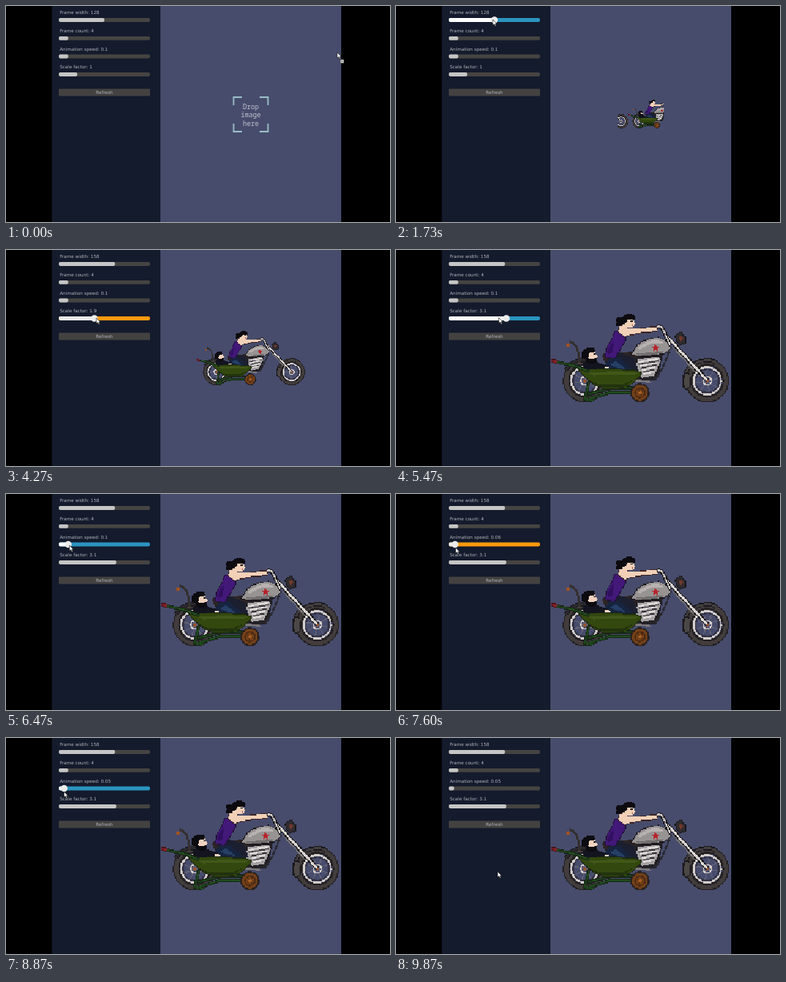
These frames come from a looping animation (480x270 px, 9940 ms). An HTML page with a canvas:

```html
<!DOCTYPE html>
<html lang="en">
<head>
<meta charset="utf-8">
<title>Sprite sheet viewer</title>
<style>
html, body { margin: 0; width: 100%; height: 100%; overflow: hidden; background: #000; }
canvas, svg { position: absolute; left: 0; top: 0; width: 480px; height: 270px; display: block; }
.label { font: 5.65px "DejaVu Sans", sans-serif; fill: #b0b3bb; }
.drop { font: 300 8.4px "Noto Sans Mono", monospace; fill: #bfc2cd; text-anchor: middle; }
</style>
</head>
<body>
<canvas id="view" width="1440" height="810"></canvas>
<svg id="ui" viewBox="0 0 480 270">
  <rect x="57.300" width="135.700" height="270" fill="#141b2c"/>
  <g id="sliders"></g>
  <rect x="66" y="103.500" width="114" height="9" rx="1" fill="#444241"/>
  <text class="label" x="123" y="110" text-anchor="middle">Refresh</text>
  <g id="zone">
    <path d="M284.500 124V114H295M317 114H327.500V124M327.500 147V157H317M295 157H284.500V147"
      fill="none" stroke="#98bdc6" stroke-width="1.800"/>
    <text class="drop" x="306" y="128.500">Drop</text>
    <text class="drop" x="306" y="139">image</text>
    <text class="drop" x="306" y="150">here</text>
  </g>
  <g id="cursor">
    <path d="M0 0V7L1.700 5.600L2.900 8.200L4.100 7.600L3 5.200H5Z" fill="#fff" stroke="#111" stroke-width=".6"/>
    <g id="badge">
      <rect x="4" y="9" width="4.200" height="4.400" fill="#f4f4f4" stroke="#222" stroke-width=".5"/>
      <path d="M6.100 10v2.400M4.900 11.200h2.400" stroke="#333" stroke-width=".6"/>
    </g>
  </g>
</svg>
<script>
const LOOP = 9940, STEP = 1000 / 15, FRAMES = 149;
const FW = 158, FH = 82, UNIT = 0.456, CX = 306, CY = 135;
const DROP_AT = 870;
const $ = id => document.getElementById(id);

// ---------- sprite sheet: vector shapes snapped to hard pixels ----------
function makeCanvas(w, h) {
  const c = document.createElement('canvas');
  c.width = w;
  c.height = h;
  return c;
}
const sheet = makeCanvas(FW * 4, FH), sheetCtx = sheet.getContext('2d');
const cell = makeCanvas(FW, FH), pen = cell.getContext('2d', { willReadFrequently: true });
const EDGE = '#1c191d';
let pose = 0, lift = 0;

function plot(color, d, width) {
  const k = 1 / (UNIT * 3.1), path = new Path2D(d);
  pen.setTransform(1, 0, 0, 1, 0, 0);
  pen.clearRect(0, 0, FW, FH);
  pen.setTransform(k, 0, 0, k, FW / 2 - CX * k, FH / 2 + (lift - CY) * k);
  pen.lineJoin = 'round';
  if (width) {
    pen.strokeStyle = color;
    pen.lineWidth = width;
    pen.stroke(path);
  } else {
    pen.fillStyle = color;
    pen.fill(path);
  }
  const img = pen.getImageData(0, 0, FW, FH);
  for (let i = 3; i < img.data.length; i += 4) img.data[i] = img.data[i] > 112 ? 255 : 0;
  pen.putImageData(img, 0, 0);
  sheetCtx.drawImage(cell, pose * FW, 0);
}
function shape(color, d, edge = EDGE) {
  plot(edge, d, 2.2);
  plot(color, d);
}
function bar(color, d, width, edge = EDGE) {
  plot(edge, d, width + 2.4);
  plot(color, d, width);
}
const circle = (x, y, r) => `M${x - r} ${y}a${r} ${r} 0 1 0 ${2 * r} 0a${r} ${r} 0 1 0 ${-2 * r} 0Z`;

function spokes(x, y, r, n, turn) {
  let d = '';
  for (let i = 0; i < n; i++) {
    const a = turn + i * 2 * Math.PI / n;
    d += `M${x} ${y}L${x + r * Math.cos(a)} ${y + r * Math.sin(a)}`;
  }
  return d;
}
function wheel(x, y) {
  plot('#252123', circle(x, y, 22.8), 8.6);
  plot('#423d3c', circle(x, y, 23.4), 4.6);
  plot('#d0cbc9', circle(x, y, 17), 2.2);
  plot('#343346', circle(x, y, 14.8), 1.6);
  plot('#646377', spokes(x, y, 14, 8, pose * 0.2), 1.3);
  plot('#d3cecb', circle(x, y, 5), 1.8);
  plot('#98512b', circle(x, y, 2));
}
function star(x, y, r) {
  let d = '';
  for (let i = 0; i < 10; i++) {
    const a = i * Math.PI / 5 - Math.PI / 2, q = i % 2 ? r * 0.42 : r;
    d += `${i ? 'L' : 'M'}${x + q * Math.cos(a)} ${y + q * Math.sin(a)}`;
  }
  return d + 'Z';
}

function drawBike() {
  wheel(236, 163.5);
  wheel(389, 163.5);

  // rear guard and tail rod
  bar('#2b2a2e', 'M212 150Q219 138 236 137Q250 138 258 150', 3);
  plot('#34302f', 'M217 114Q226 118 228 128L230 140', 2.6);
  plot('#a4521f', 'M213 117h4v4h-4Z');

  // frame and engine
  plot('#252329', 'M258 130L300 129L334 129L330 150L324 163L288 166L266 154Z');
  plot('#2b2930', 'M342 126L333 148L324 163', 2);
  shape('#a5a1a3', 'M302 137L327 133L331 138L323 157L307 160L299 149Z');
  plot('#dcd8d6', 'M303 140L328 136M305 145L327 141M307 150L325 146M309 155L323 152', 1.8);
  plot('#39363c', 'M303 143L328 138.500M306 148L326 143.500M308 153L324 149', 1.3);
  shape('#aba7a8', circle(295, 152, 4));
  plot('#7c787b', 'M280 160L300 163L318 165', 2);

  // tank and seat
  plot('#2c2424', 'M258 131Q272 128 298 127L303 134L284 140L260 138Z');
  shape('#989393', 'M294 131L303 118Q315 110 329 110L340 116L343 123L335 129L314 132Z');
  plot('#b7b2b0', 'M302 123Q311 113 326 112L336 116L320 117L307 123Z');
  plot('#726d6e', 'M298 130L336 126L333 129L314 132Z');
  plot('#b8232a', star(324, 122.5, 5.6));

  // front end
  bar('#433f40', 'M362 173Q358 157 366 147Q376 138 390 138Q397 138 401 141', 2.8);
  shape('#4b4746', 'M361 155L366 155L367 171L362 174L360 167Z');
  bar('#dcd7d3', 'M338 107L389 163', 2.6);
  plot('#7d7878', 'M346 121L374 152', 1.6);
  bar('#ccc7c4', 'M324 98L329 95Q334 97 337 107L343 119', 1.8);
  shape('#2f2c30', 'M350 107L356 103L361 109L361 116L355 118L351 114Z');
  plot('#71382b', circle(356.5, 110.5, 2.6));

  lift = pose === 2 ? -1.4 : 0;
  drawRider();
  drawPassenger();
  lift = 0;
  drawBarrow();
}

function drawRider() {
  const skin = '#f2d0b8', hair = '#0d0b10', line = '#3d2729';
  plot('#1b1f30', 'M262 132L278 128L296 134L303 150L294 152L286 142L266 140Z');
  shape('#421879', 'M274 102L285 105L287 111L281 122L273 135L262 133L264 123L270 112Z', '#25113f');
  plot('#321060', 'M266 123L273 111L270 128L264 132Z');
  shape(skin, 'M280 95L287 95L290 99L304 98.500L325 96.500L327 101L308 103L291 106L286 108L278 102Z', line);
  plot(skin, 'M285 85L296 85L297 89L299 92L296 96L289 97L284 95Z');
  plot(hair, 'M281 86Q284 80 292 80L298 82L299 87L290 87L286 92L281 94Z');
  plot(hair, 'M283 84L277 84L275 87L276 91L274 95L279 96L282 92Z');
  plot(hair, 'M293 89.500h3', 1.5);
  plot('#b6645e', 'M294 94h3', 1.3);
}

function drawPassenger() {
  const skin = '#f0d2bf', hair = '#0c0b10';
  plot('#17243f', 'M256 150L267 136L279 135L298 151L286 155L263 154Z');
  plot('#263f66', 'M267 143L275 139L287 149L276 147Z');
  plot('#13141f', 'M233 141L249 140L264 145L269 152L253 154L235 152Z');
  plot(skin, 'M239 126L249 126L250 130L252 133L250 138L241 138L238 133Z');
  plot(hair, 'M232 134L233 126Q238 121 247 122L250 127L242 128L240 134L236 137Z');
  plot(hair, 'M238 133L241 136L247 136L251 135L250 141L243 142L237 139Z');
  plot(hair, 'M246 130h3', 1.4);
  plot(skin, 'M260 146L267 147L269 151L262 150Z');
}

function drawBarrow() {
  const green = '#1f4c1f', dark = '#182717';
  bar(green, 'M242 160L236 187L246 188M240 180L269 173L298 172', 1.4, dark);
  bar(green, 'M240 187L267 178L304 178', 1.4, dark);
  shape('#33480f', 'M225 145L240 150L270 149L300 151L307 154L297 165L285 172L262 173L248 168L236 158Z', '#1d2612');
  plot('#42581a', 'M232 150L246 154L274 152L304 154L297 156L270 156L247 157Z');
  plot('#22330d', 'M243 163L252 167L283 168L296 163L285 171L262 172L249 168Z');
  bar('#24521f', 'M200 139.500L226 146L242 152', 1.6, dark);
  bar('#8b2429', 'M193 138L202 140', 2, '#4d151b');
  plot('#2a2220', circle(305, 178.5, 12));
  plot('#744017', circle(305, 178.5, 10));
  plot('#4a2a16', circle(305, 178.5, 6), 1.8);
  plot('#5d3315', spokes(305, 178.5, 6, 4, pose * 0.4), 1.4);
  plot('#a55f27', circle(305, 178.5, 2.2));
}

for (pose = 0; pose < 4; pose++) drawBike();

// ---------- timeline ----------
const smooth = p => p * p * (3 - 2 * p);

function along(keys, t, ease = p => p) {
  let i = 1;
  while (i < keys.length && keys[i][0] <= t) i++;
  const a = keys[i - 1], b = keys[i] || a;
  const p = b === a ? 0 : ease((t - a[0]) / (b[0] - a[0]));
  return a.slice(1).map((v, n) => v + (b[n + 1] - v) * p);
}

const cursorKeys = [
  [0, 414, 58], [100, 414, 58], [740, 305, 132], [880, 305, 132],
  [1550, 121, 17], [1900, 121, 17], [2650, 135, 17], [2900, 135, 17],
  [3650, 91, 85], [3870, 91, 85], [4270, 113, 85], [5150, 139, 85],
  [5470, 128.5, 84.5], [5850, 124, 84], [6500, 79, 64], [6900, 79, 64],
  [7150, 74.5, 67], [7900, 74.5, 67], [8150, 72.5, 67], [8870, 72.5, 67], [9750, 127, 167]
];
const cut = (v, n) => Math.floor(v * n + 1e-6) / n;

const sliders = [
  { name: 'Frame width', y: 17.5, max: 256, unit: 1, keys: [[0, 128], [1900, 128], [2650, 158]], drag: [1870, 2750] },
  { name: 'Frame count', y: 40.3, max: 40, unit: 1, keys: [[0, 4]] },
  { name: 'Animation speed', y: 63, max: 1, unit: 100, keys: [[0, .1], [6930, .1], [7150, .065], [7900, .065], [8150, .055]], drag: [6930, 8500] },
  { name: 'Scale factor', y: 85.5, max: 5, unit: 10, keys: [[0, 1], [3870, 1], [4270, 1.95], [4800, 2.75], [5150, 3.16]], drag: [3870, 5250] }
];

function set(el, attrs) {
  for (const k in attrs) el.setAttribute(k, attrs[k]);
}
function add(tag, attrs) {
  const el = document.createElementNS('http://www.w3.org/2000/svg', tag);
  set(el, attrs);
  $('sliders').append(el);
  return el;
}
for (const s of sliders) {
  const box = { x: 66, y: s.y - 2.4, height: 4.8, rx: 1.8 };
  s.text = add('text', { class: 'label', x: 67.2, y: s.y - 7.2 });
  s.track = add('rect', { ...box, width: 114 });
  s.fill = add('rect', box);
  s.knob = add('circle', { cy: s.y, r: 4.2, fill: '#ececec' });
}
const valueAt = (s, t) => along(s.keys, t)[0];

// running sprite position, advanced by 60 ticks a second
const phases = [2.62];
for (let i = 1; i < FRAMES; i++) {
  phases[i] = phases[i - 1] + cut(valueAt(sliders[2], i * STEP), 100) * 60 * STEP / 1000;
}

const view = $('view').getContext('2d');

function drawSprite(t, frame) {
  view.setTransform(3, 0, 0, 3, 0, 0);
  view.fillStyle = '#000';
  view.fillRect(0, 0, 480, 270);
  view.fillStyle = '#474c6c';
  view.fillRect(193, 0, 226, 270);
  if (t < DROP_AT) return;
  const fw = cut(valueAt(sliders[0], t), 1), scale = cut(valueAt(sliders[3], t), 10) * UNIT;
  const index = Math.floor(phases[frame]) % 4;
  view.save();
  view.beginPath();
  view.rect(193, 0, 226, 270);
  view.clip();
  view.imageSmoothingEnabled = false;
  view.drawImage(sheet, index * fw, 0, fw, FH, CX - fw * scale / 2, CY - FH * scale / 2, fw * scale, FH * scale);
  view.restore();
}

function drawSlider(s, t, x, y) {
  const v = valueAt(s, t), end = 66.5 + 113 * v / s.max;
  const held = s.drag && t >= s.drag[0] && t < s.drag[1];
  const hot = held || (x >= 66 && x <= 180 && Math.abs(y - s.y) <= 5);
  s.text.textContent = `${s.name}: ${cut(v, s.unit)}`;
  set(s.track, { fill: held ? '#ff990f' : hot ? '#2b94bf' : '#464442' });
  set(s.fill, { width: end - 66, fill: held ? '#e8e8e8' : hot ? '#fff' : '#c5c5c5' });
  set(s.knob, { cx: end, visibility: hot ? 'visible' : 'hidden' });
}

function render(time) {
  const frame = Math.min(FRAMES - 1, Math.floor((time % LOOP + 4) / STEP));
  const t = frame * STEP + 1;
  const [x, y] = along(cursorKeys, t, smooth);
  drawSprite(t, frame);
  for (const s of sliders) drawSlider(s, t, x, y);
  const before = t < DROP_AT ? 'visible' : 'hidden';
  set($('zone'), { visibility: before });
  set($('badge'), { visibility: before });
  set($('cursor'), { transform: `translate(${x} ${y})` });
}

let start;
function tick(now) {
  start ??= now;
  render(now - start);
  requestAnimationFrame(tick);
}
render(0);
requestAnimationFrame(tick);
</script>
</body>
</html>
```
